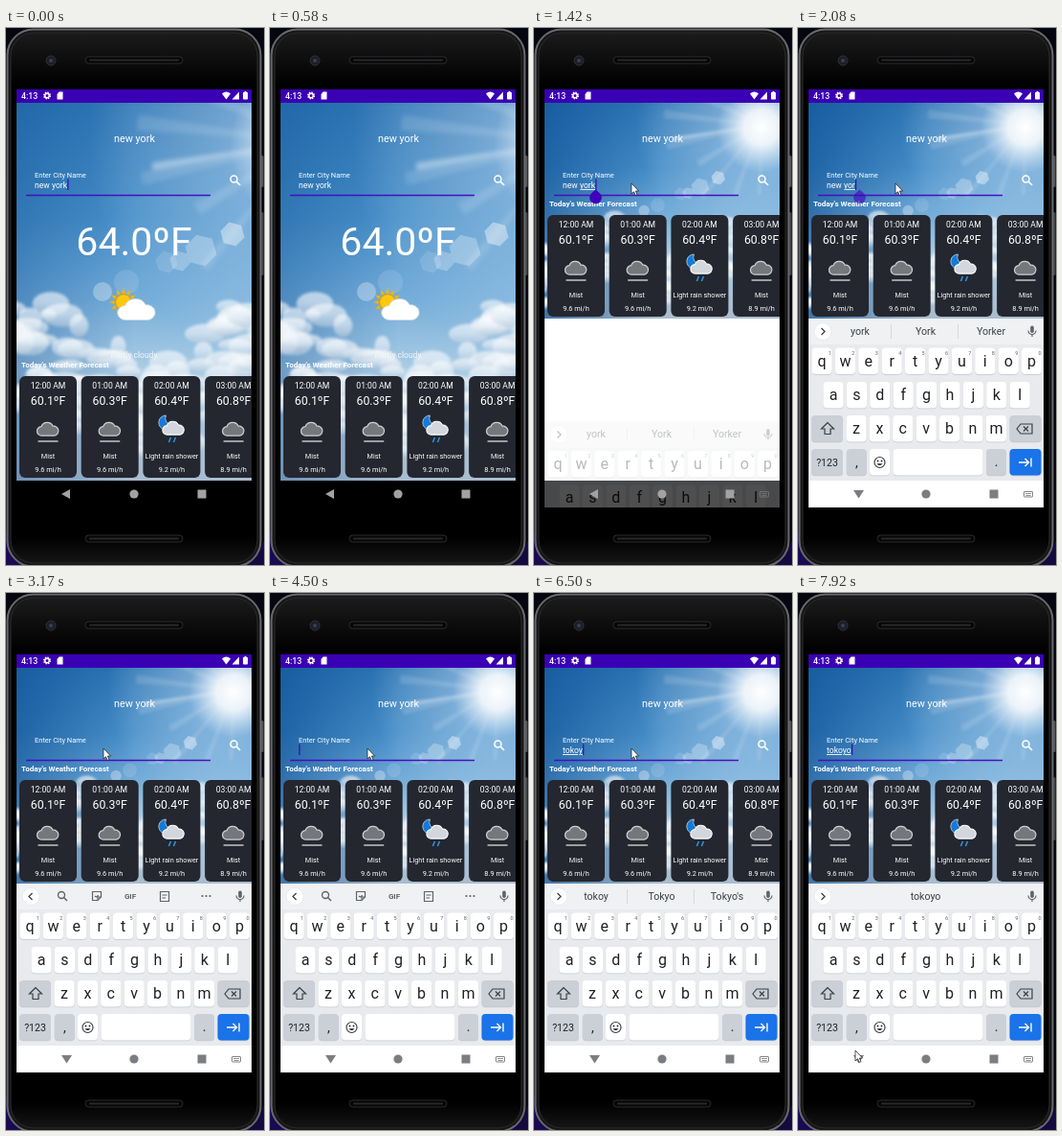
Recreate the animation shown at these times as an HTML page. Size 270 px wide and 560 px high, loop 8000 ms.

```html
<!DOCTYPE html>
<html lang="en">
<head>
<meta charset="utf-8">
<title>Weather app</title>
<style>
  html, body { margin: 0; width: 100%; height: 100%; overflow: hidden; background: #05060f; }
  svg { display: block; width: 270px; height: 560px; }
  text { font-family: Roboto, "Noto Sans", sans-serif; white-space: pre; }
  .mid { text-anchor: middle; }
</style>
</head>
<body>
<svg id="stage" viewBox="0 0 270 560" xmlns="http://www.w3.org/2000/svg"></svg>
<script>
const LOOP = 8000, TAP = 1200, RESIZE = 1370;
const CLOUD = 'M-7 7A5 5 0 0 1-7.5-3A7 7 0 0 1 5.5-3.5A5.3 5.3 0 0 1 7 7Z';

const text = (x, y, size, str, fill = '#fff', extra = '') =>
  `<text x="${x}" y="${y}" font-size="${size}" fill="${fill}" ${extra}>${str}</text>`;
const label = (x, y, size, str, fill, extra = '') => text(x, y, size, str, fill, `class="mid" ${extra}`);
const rect = (x, y, w, h, fill, rx = 0, extra = '') =>
  `<rect x="${x}" y="${y}" width="${w}" height="${h}" rx="${rx}" fill="${fill}" ${extra}/>`;
const circle = (x, y, r, fill, extra = '') => `<circle cx="${x}" cy="${y}" r="${r}" fill="${fill}" ${extra}/>`;
const path = (d, fill, extra = '') => `<path d="${d}" fill="${fill}" ${extra}/>`;
const line = (d, color, width = 1.2, extra = '') =>
  `<path d="${d}" fill="none" stroke="${color}" stroke-width="${width}" ${extra}/>`;
const group = (content, attrs) => `<g ${attrs}>${content}</g>`;
const at = (x, y, content) => group(content, `transform="translate(${x} ${y})"`);
const times = (n, fn) => Array.from({ length: n }, (_, i) => fn(i)).join('');

function seeded(seed) {
  return () => (seed = (seed * 16807) % 2147483647) / 2147483647;
}

function hexagon(x, y, r, opacity) {
  const points = Array.from({ length: 6 }, (_, i) => {
    const a = i * Math.PI / 3 + 0.25;
    return `${x + r * Math.cos(a)},${y + r * Math.sin(a)}`;
  });
  return `<polygon points="${points.join(' ')}" fill="#fff" opacity="${opacity}"/>`;
}

// A wide picture: the tall view crops its sides, the short view shows nearly all of it.
function sky() {
  const rnd = seeded(77), sunX = 316, sunY = 40;
  const ray = (angle, spread, length, opacity) => {
    const end = a => `${sunX + length * Math.cos(a)} ${sunY + length * Math.sin(a)}`;
    return path(`M${sunX} ${sunY}L${end(angle - spread)}L${end(angle + spread)}Z`, '#fff', `opacity="${opacity}"`);
  };
  const rays = ray(2.98, .025, 165, .4) + times(10, i => ray(1.6 + i * .33, .03 + rnd() * .03, 120 + rnd() * 60, .14));
  const puffs = times(190, i => {
    const x = -95 + rnd() * 460;
    const y = 226 - 28 * Math.cos((x - 25) / 38) + i * .6 + rnd() * 14;
    return `<ellipse cx="${x}" cy="${y}" rx="${8 + rnd() * 17}" ry="${6 + rnd() * 8}" fill="url(#puff)" opacity=".62"/>`;
  });
  return rect(-95, 0, 460, 394, 'url(#skyFill)') + rect(-95, 0, 460, 394, 'url(#leftShade)') +
    rect(-95, 0, 460, 394, 'url(#glow)') + group(rays, 'filter="url(#soft)"') +
    group(puffs, 'filter="url(#cloudy)"') +
    hexagon(237, 137, 13, .4) + hexagon(204, 154, 17, .27) + hexagon(182, 165, 11, .25) + hexagon(168, 166, 12, .13) +
    circle(101, 197, 10, '#fff', 'opacity=".3"') + circle(126, 187, 13, '#fff', 'opacity=".12"');
}

function phone() {
  const speaker = y => rect(83, y, 102, 7, '#050505', 3.5, 'stroke="#2c2d2f"') + rect(87, y + 2.5, 94, 2, '#28292b', 1);
  return rect(0, 0, 270, 560, '#05060f') + path('M0 525V560H35Z', '#190a52') + path('M270 535V560H245Z', '#140a40') +
    rect(266, 133, 3.5, 33, '#55565b', 1.5) + rect(266, 192, 3.5, 66, '#45464b', 1.5) +
    rect(1.5, 1.5, 265, 560, '#161617', 27, 'stroke="#68696b" stroke-width="2"') +
    rect(5, 5, 258, 553, 'url(#body)', 24, 'stroke="#2a2b2c"') +
    speaker(30) + speaker(529) +
    circle(47, 34, 5, '#1c1e24', 'stroke="#303238"') + circle(47, 34, 2, '#36405a');
}

function statusBar() {
  const teeth = circle(43, 70.5, 3.1, 'none', 'stroke="#fff" stroke-width="1.8" stroke-dasharray="1.4 1.03"');
  return rect(11, 64, 246, 14, '#3a00b3') + text(16, 74, 8.8, '4:13', '#fff', 'font-weight="500"') +
    teeth + circle(43, 70.5, 2.2, 'none', 'stroke="#fff" stroke-width="1.4"') +
    path('M53.5 69L55.5 66.5H59.5V74.5H53.5Z', '#fff') +
    path('M226 68.5Q230.5 64.5 235 68.5L230.5 74.5Z', '#fff') +
    path('M244 66.5V74.5H236.5Z', '#fff') + rect(248, 67, 5, 7.5, '#fff', .7) + rect(249.5, 66, 2, 1.5, '#fff');
}

function partlyCloudy() {
  const rays = times(12, i => `<path d="M-2-9.3L0-15L2-9.3Z" fill="#f4b400" transform="rotate(${i * 30})"/>`);
  return at(123, 286, rays + circle(0, 0, 8.3, '#fdc80e', 'stroke="#e39a00" stroke-width=".9"')) +
    at(137, 294, path(CLOUD, '#fff', 'stroke="#d3dce4" stroke-width=".5" transform="scale(1.65 1.5)"'));
}

const mist = path(CLOUD, '#75777c', 'stroke="#d0d1d4" stroke-width="1.3" transform="translate(0 -.5) scale(.94)"') +
  line('M-10.5 12H10.5', '#c4c5c9', 1.5);
const nightRain = path('M-6-15A7.5 7.5 0 1 0 1-5A7 7 0 0 1-6-15Z', '#1579d8', 'stroke="#dcecfb" stroke-width=".7"') +
  path(CLOUD, '#d3d6dc', 'stroke="#fff" stroke-width="1.2" transform="translate(2 -1.5) scale(.94)"') +
  line('M-1 8L-3 13M4 8L2 13', '#2f95ea', 1.5);

function card([time, temp, sort, wind], i) {
  return at(14 + i * 64.7, 363, rect(0, 0, 60, 106, '#24272f', 6) +
    label(30, 12.5, 8.6, time) + label(30, 29.5, 12.3, temp + 'ºF') +
    at(30, 56, sort === 'Mist' ? mist : nightRain) +
    label(30, 86, 7.3, sort) + label(30, 100, 7.4, wind + ' mi/h'));
}

function forecast() {
  const hours = [['12:00 AM', '60.1', 'Mist', '9.6'], ['01:00 AM', '60.3', 'Mist', '9.6'],
    ['02:00 AM', '60.4', 'Light rain shower', '9.2'], ['03:00 AM', '60.8', 'Mist', '8.9']];
  return text(16, 354, 8, "Today's Weather Forecast", '#fff', 'font-weight="700"') + hours.map(card).join('');
}

function keyboard() {
  const ink = '#202124', special = '#cbcfd6';
  const key = (x, y, w, fill = '#fff') =>
    rect(x, y + .8, w, 27.5, '#c3c6cb', 4) + rect(x, y, w, 27.5, fill, 4);
  const row = (letters, x, y) => [...letters].map((c, i) =>
    key(x + i * 24.4 - 10.6, y - 14, 21.2) + label(x + i * 24.4, y + 5, 16, c, ink)).join('');
  const numbers = times(10, i => label(33.5 + i * 24.4, 340.5, 5.5, (i + 1) % 10, '#5f6368'));
  const mic = rect(243.2, 310.5, 3.6, 7.5, '#5f6368', 1.8) + line('M241 315.5A4 4 0 0 0 249 315.5M245 319.5V322', '#5f6368');
  const shift = line('M31 411.5L24.5 418H28V423.5H34V418H37.5Z', '#3c4043');
  const back = line('M229 418L233 413H245V423H233ZM236 415.5L241 420.5M241 415.5L236 420.5', '#3c4043');
  const smile = circle(85.5, 453, 5.5, 'none', 'stroke="#3c4043" stroke-width="1.2"') +
    circle(83.5, 451.5, .9, ink) + circle(87.5, 451.5, .9, ink) + path('M82.5 454.2H88.5Q85.5 458 82.5 454.2', ink);
  const tools = circle(58, 315, 3.5, 'none', 'stroke="#5f6368" stroke-width="1.4"') + line('M60.5 317.5L64 321', '#5f6368', 1.5) +
    line('M90.5 311.5H99.5V317L96 320.5H90.5ZM99 317H96V320M93 316Q95 318 96.5 315', '#5f6368') +
    label(130, 319, 8, 'GIF', '#5f6368', 'font-weight="700"') +
    line('M161.5 311.5H170.5V321.5H161.5ZM164 311.5H168M163.5 315H168.5M163.5 318H167', '#5f6368') +
    times(3, i => circle(205.5 + i * 4, 316, 1.1, '#5f6368'));
  return rect(11, 303, 246, 169, '#e8eaed') + rect(11, 303, 246, 27, '#eff1f3') + rect(11, 472, 246, 28, '#fff') +
    circle(26, 316.5, 9, '#fff', 'stroke="#dfe1e5" stroke-width=".6"') +
    line('', '#3c4043', 1.3, 'id="chevron"') + mic +
    group(tools, 'id="tools"') +
    line('M97.5 309V324M167.5 309V324', '#cfd2d7', .8, 'id="dividers"') +
    times(3, i => label([65, 133.5, 202][i], 320, 10.6, '', '#3c4043', `id="hint${i}"`)) +
    row('qwertyuiop', 25, 347.5) + numbers + row('asdfghjkl', 37, 383) + row('zxcvbnm', 61, 418) +
    key(14, 404, 33, special) + shift + key(221.5, 404, 33, special) + back +
    key(14, 439, 33, special) + label(30.5, 457, 10.5, '?123', ink) +
    key(50.8, 439, 21, special) + label(61.3, 458, 14, ',', ink) +
    key(75, 439, 21) + smile + key(99.5, 439, 94) + key(197, 439, 21, special) + label(207.5, 457, 14, '.', ink) +
    key(221.5, 439, 33, '#1a73e8') + line('M231 453H241M237.5 449L241.5 453L237.5 457M244 448.5V457.5', '#fff', 1.4);
}

function navigation() {
  return path('', 'inherit', 'id="navBack"') + circle(134, 486, 4.6, 'inherit') + rect(200.5, 481.5, 9, 9, 'inherit') +
    group(rect(236.5, 483.5, 9, 5.5, 'none', .5, 'stroke="#777" stroke-width=".9"') +
      line('M238 485.5H244M238.5 487.5H243.5', '#777', .8), 'id="imeIcon"');
}

document.getElementById('stage').innerHTML = `
<defs>
  <linearGradient id="skyFill" x2="0" y2="1">
    <stop offset="0" stop-color="#2f77b6"/><stop offset=".3" stop-color="#478fc9"/>
    <stop offset=".52" stop-color="#76aeda"/><stop offset=".7" stop-color="#a9cbe4"/><stop offset="1" stop-color="#a9bccd"/>
  </linearGradient>
  <linearGradient id="leftShade">
    <stop offset="0" stop-color="#0b4f94" stop-opacity=".7"/><stop offset=".5" stop-color="#0b4f94" stop-opacity="0"/>
  </linearGradient>
  <linearGradient id="puff" x2="0" y2="1">
    <stop offset="0" stop-color="#fff"/><stop offset=".45" stop-color="#eff4f9"/><stop offset="1" stop-color="#b3c8db"/>
  </linearGradient>
  <linearGradient id="body" x2="0" y2="1">
    <stop offset="0" stop-color="#1b1b1c"/><stop offset=".1" stop-color="#000"/><stop offset=".95" stop-color="#000"/>
    <stop offset="1" stop-color="#151516"/>
  </linearGradient>
  <radialGradient id="glow" gradientUnits="userSpaceOnUse" cx="316" cy="45" r="230">
    <stop offset="0" stop-color="#fff"/><stop offset=".14" stop-color="#fff" stop-opacity=".9"/>
    <stop offset=".36" stop-color="#e6f3ff" stop-opacity=".36"/><stop offset="1" stop-color="#fff" stop-opacity="0"/>
  </radialGradient>
  <filter id="soft"><feGaussianBlur stdDeviation="2.5"/></filter>
  <filter id="cloudy"><feGaussianBlur stdDeviation="1.5"/></filter>
  <clipPath id="screen"><rect x="11" y="64" width="246" height="436"/></clipPath>
  <clipPath id="picture"><rect x="-95" y="0" width="460" height="394"/></clipPath>
</defs>` + phone() + group(
  rect(11, 78, 246, 394, '#fff') + rect(11, 472, 246, 28, '#000') +
  group(group(sky(), 'clip-path="url(#picture)"'), 'id="sky"') + statusBar() +
  label(134.5, 119, 10.8, 'new york') +
  text(30, 156, 7.5, 'Enter City Name') + text(30, 167, 8.6, '<tspan id="done"></tspan><tspan id="composing"></tspan>', '#fff', 'id="field"') +
  line('M21 174.5H214', '#4310bd', 1.3) + rect(0, 157.5, 1.1, 11.5, '#3a00b3', 0, 'id="caret"') +
  circle(238.5, 157.5, 3.5, 'none', 'stroke="#fff" stroke-width="1.5"') + line('M241 160L245 164', '#fff', 1.7) +
  group(label(134, 237, 41, '64.0ºF') + partlyCloudy() + label(134, 344, 8.5, 'Partly cloudy', '#f4f6f8'), 'id="current"') +
  group(forecast(), 'id="forecast"') +
  path('M64.5 168.5L69 172.5A6.3 6.3 0 1 1 60 172.5Z', '#3f00bd', 'id="handle"') +
  group(keyboard(), 'id="keyboard"') + group(navigation(), 'id="nav"'), 'clip-path="url(#screen)"') +
  path('M0 0V11L2.5 8.7L4.2 12.5L6 11.7L4.4 8H7.6Z', '#fff', 'id="mouse" stroke="#111" stroke-width=".7"');

const el = Object.fromEntries([...document.querySelectorAll('[id]')].map(n => [n.id, n]));
const set = (id, name, value) => el[id].setAttribute(name, value);
const show = (id, on) => set(id, 'visibility', on ? 'visible' : 'hidden');

const edits = [[-20, 'new york'], [TAP, 'new york'], [2040, 'new yor'],
  ...Array.from({ length: 7 }, (_, i) => [2130 + i * 58, 'new yor'.slice(0, 6 - i)]),
  ...[4700, 5050, 5400, 5750, 6080, 6670].map((time, i) => [time, 'tokoyo'.slice(0, i + 1)])];

const hints = {
  t: ['t', 'to', 'the'], to: ['to', 'too', 'today'], tok: ['tok', 'took', 'token'],
  toko: ['toko', 'took', 'Tokyo'], tokoy: ['tokoy', 'Tokyo', "Tokyo's"], tokoyo: ['', 'tokoyo', '']
};

const mousePath = [[780, 276, 330], [1130, 102, 162], [7350, 102, 162], [7850, 60, 477], [LOOP, 60, 477]];

const clamp = x => Math.max(0, Math.min(1, x));
const smooth = x => x * x * (3 - 2 * x);

function drawMouse(t) {
  const i = mousePath.findIndex(p => p[0] > t);
  show('mouse', i > 0);
  if (i < 1) return;
  const [t0, x0, y0] = mousePath[i - 1], [t1, x1, y1] = mousePath[i];
  const k = smooth((t - t0) / (t1 - t0));
  set('mouse', 'transform', `translate(${x0 + (x1 - x0) * k} ${y0 + (y1 - y0) * k})`);
}

function drawField(t) {
  const [since, value] = edits.filter(e => e[0] <= t).pop();
  const split = t < TAP ? value.length : value.lastIndexOf(' ') + 1;
  el.done.textContent = value.slice(0, split);
  el.composing.textContent = value.slice(split);
  set('composing', 'text-decoration', 'underline');
  set('caret', 'x', 30.3 + (value ? el.field.getComputedTextLength() : 0));
  show('caret', (t - since) % 1000 < 500);
  return value;
}

function drawHints(t, value) {
  const words = hints[value] || (t < 2420 ? ['york', 'York', 'Yorker'] : null);
  show('tools', !words);
  show('dividers', words && words[0]);
  set('chevron', 'd', words ? 'M24.5 313L28 316.5L24.5 320' : 'M27.5 313L24 316.5L27.5 320');
  for (let i = 0; i < 3; i++) el['hint' + i].textContent = words ? words[i] : '';
}

function draw(t) {
  const compact = t >= RESIZE;
  const open = 1 - (1 - clamp((t - RESIZE) / 300)) ** 2;
  set('sky', 'transform', `translate(134 78) scale(${compact ? 225 / 394 : 1}) translate(-134 0)`);
  set('forecast', 'transform', `translate(0 ${compact ? -168 : 0})`);
  show('current', !compact);
  set('keyboard', 'opacity', open);
  set('keyboard', 'transform', `translate(0 ${156 * (1 - open)})`);
  set('navBack', 'd', open > .5 ? 'M58 482H69L63.5 490.5Z' : 'M58 486L67 481V491Z');
  set('nav', 'fill', open > .5 ? '#7c7d80' : '#a2a2a2');
  show('imeIcon', compact);
  show('handle', t >= TAP && t < 2200);
  set('handle', 'opacity', 1 - clamp((t - 2000) / 200));
  drawHints(t, drawField(t));
  drawMouse(t);
}

const start = performance.now();
function tick() {
  draw((performance.now() - start) % LOOP);
  requestAnimationFrame(tick);
}
draw(0);
requestAnimationFrame(tick);
</script>
</body>
</html>
```
